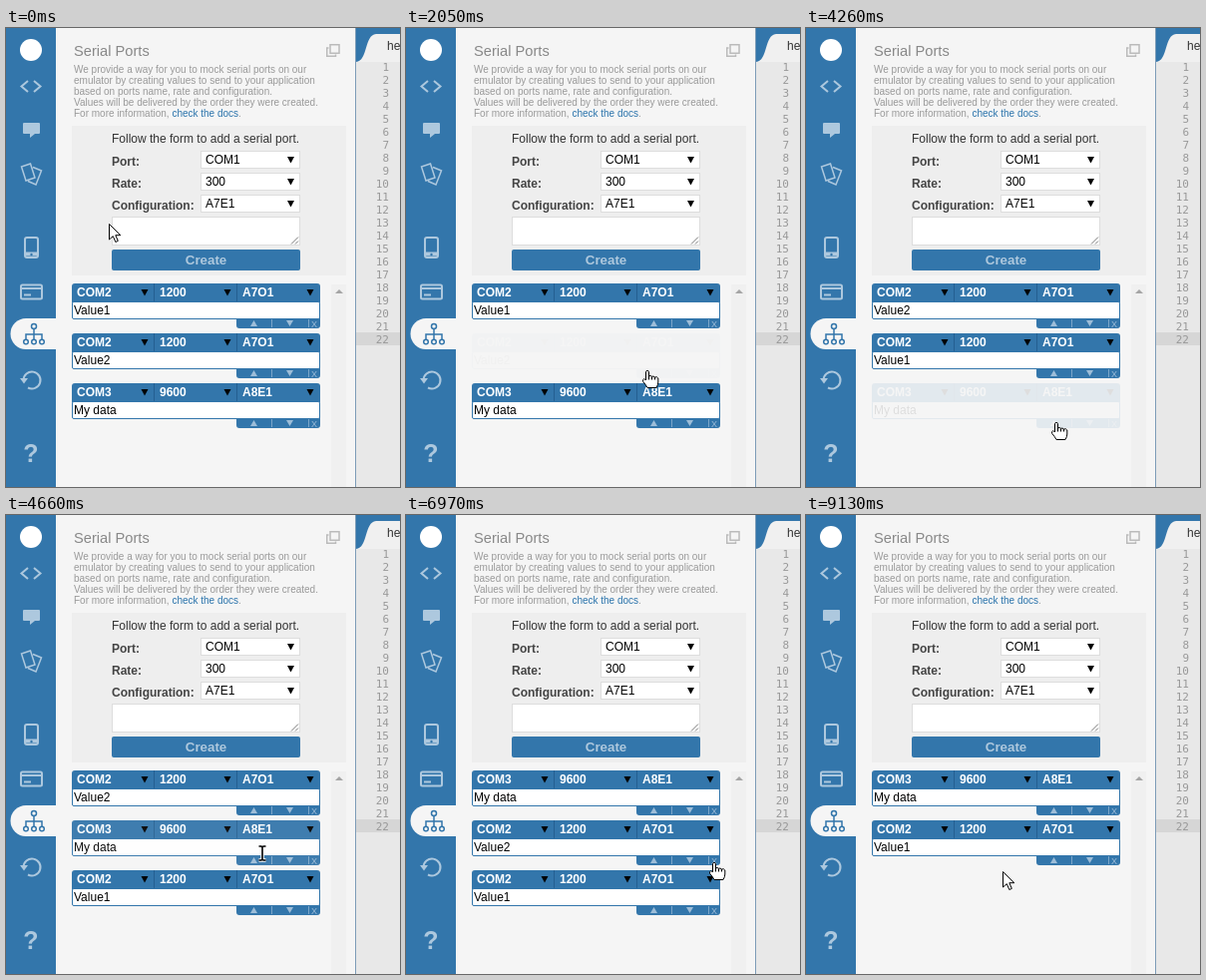
Animation, 395 px wide and 460 px high, one loop 9.34 s. Source, as an HTML page:

```html
<!DOCTYPE html>
<html lang="en">
<head>
<meta charset="utf-8">
<title>Serial Ports</title>
<style>
  html, body { margin: 0; width: 100%; height: 100%; overflow: hidden; background: #f5f5f5; }
  svg { display: block; font: 12px "Liberation Sans", Arial, sans-serif; }
  .bold { font-weight: bold; }
  .small { font-size: 10px; fill: #999; }
  .lines { font: 11px "DejaVu Sans Mono", monospace; fill: #999; text-anchor: end; }
  .icon { fill: none; stroke: #adc8de; stroke-width: 2; }
  .button { fill: #9dbdd8; }
  .button.hover { fill: #fff; }
  .box { fill: #fff; stroke: #ddd; }
  .cursor { fill: #fff; stroke: #000; stroke-linejoin: round; }
</style>
</head>
<body>
<svg width="395" height="460" viewBox="0 0 395 460">
  <rect width="395" height="460" fill="#f5f5f5"/>

  <!-- sidebar -->
  <rect width="50" height="460" fill="#3376ab"/>
  <circle cx="25" cy="22" r="11" fill="#fff"/>
  <g class="icon">
    <path d="M22 53L15.500 58.500L22 64M28 53L34.500 58.500L28 64"/>
    <path d="M18 95H33Q34 95 34 96V105Q34 106 33 106H29L24 110V106H18Q17 106 17 105V96Q17 95 18 95Z" fill="#adc8de" stroke="none"/>
    <path d="M15.500 139L24.500 136L29 150L20 153ZM27 139.500L35.500 143L30 157L22 153.500" stroke-width="1.500"/>
    <rect x="19" y="210" width="13" height="20" rx="2"/>
    <path d="M19 226.500H32" stroke-width="4"/>
    <circle cx="25.500" cy="227" r="1.200" fill="#3376ab" stroke="none"/>
    <rect x="15" y="257.500" width="21" height="14" rx="1.500"/>
    <path d="M15 261H36M18 267.500H25"/>
    <path d="M17.500 353A8.500 8.500 0 1 1 22 360.500"/>
    <path d="M14 351H22L18 356.500Z" fill="#adc8de" stroke="none"/>
  </g>
  <path d="M50 291H20A15.500 15.500 0 0 0 20 322H50Z" fill="#f5f5f5"/>
  <g fill="none" stroke="#3376ab" stroke-width="1.500">
    <path d="M28 301V312M20 312V307H36V312"/>
    <circle cx="28" cy="299" r="2.500"/>
    <circle cx="20" cy="314.500" r="2.300"/>
    <circle cx="28" cy="314.500" r="2.300"/>
    <circle cx="36" cy="314.500" r="2.300"/>
  </g>
  <text class="bold" x="25" y="435" font-size="25" fill="#adc8de" text-anchor="middle">?</text>

  <!-- editor -->
  <rect x="350" width="1" height="460" fill="#7d9cb8"/>
  <rect x="351" width="44" height="34" fill="#3376ab"/>
  <path d="M351 34C363 33 359 7 371 6H395V34Z" fill="#f0f0f0"/>
  <rect x="351" y="34" width="44" height="426" fill="#e8e8e8"/>
  <rect x="351" y="305" width="44" height="13" fill="#d6d6d6"/>
  <text x="382" y="22" fill="#333">he</text>
  <g class="lines" id="lines"></g>

  <!-- panel -->
  <text x="68" y="28" font-size="14.670" fill="#888">Serial Ports</text>
  <g fill="none" stroke="#bbb" stroke-width="1.500">
    <rect x="325" y="16.750" width="9" height="8.500"/>
    <path d="M323.500 20H321.750V28.250H330.500V26.500"/>
  </g>
  <g class="small">
    <text x="68" y="45">We provide a way for you to mock serial ports on our</text>
    <text x="68" y="56">emulator by creating values to send to your application</text>
    <text x="68" y="67">based on ports name, rate and configuration.</text>
    <text x="68" y="78">Values will be delivered by the order they were created.</text>
    <text x="68" y="89">For more information, <tspan fill="#2a73ab">check the docs</tspan>.</text>
  </g>

  <!-- form -->
  <rect x="66" y="98" width="275" height="150" fill="#eee"/>
  <text x="106" y="115" fill="#333">Follow the form to add a serial port.</text>
  <g id="fields"></g>
  <rect class="box" x="106.500" y="189.500" width="188" height="28"/>
  <path d="M286 216.500L293 209.500M290 216.500L293 213.500" stroke="#777"/>
  <rect x="106" y="222" width="189" height="21" rx="2" fill="#3376ab"/>
  <text class="bold" x="200.500" y="237" font-size="13.330" fill="#aec8dd" text-anchor="middle">Create</text>

  <!-- list -->
  <rect x="326" y="257" width="15" height="203" fill="#f0f0f0"/>
  <path d="M330 266H338L334 262Z" fill="#a5a5a5"/>
  <g id="list"></g>

  <g class="cursor" id="arrow"><path d="M.500 .500V16L4.300 12.600L6.800 18.500L9.300 17.400L6.800 11.700H11.800Z"/></g>
  <g class="cursor" id="hand">
    <path d="M-1.500 10V1.500Q-1.500 .500 0 .500Q1.500 .500 1.500 1.500V6Q3 4.800 4.500 6.300Q6 5.400 7.500 7Q9.500 6 10.800 8V12Q10.800 14.500 9 17.500H0Q-1.500 14.500-4.200 11.500Q-5.200 9.300-3.500 8.800Q-2.300 8.800-1.500 10Z"/>
    <path d="M1.500 6V9.500M4.500 6.500V9.500M7.500 7V9.500" fill="none"/>
  </g>
  <g id="beam" fill="none">
    <path d="M-3.500-7H-1L0-6L1-7H3.500M-3.500 7H-1L0 6L1 7H3.500M0-6V6" stroke="#fff" stroke-width="3.500"/>
    <path d="M-3.500-7H-1L0-6L1-7H3.500M-3.500 7H-1L0 6L1 7H3.500M0-6V6" stroke="#000" stroke-width="1.600"/>
  </g>
</svg>
<script>
const LOOP = 9340, ROW_TOP = 256, ROW_STEP = 50;
const FADE_START = 30, FADE_END = 490, RETURN_END = 860;
const byId = id => document.getElementById(id);
const down = (x, y) => `<path d="M${x - 3.5} ${y}h7l-3.500 6.500z"/>`;

byId("lines").innerHTML = Array.from({ length: 22 }, (_, i) =>
  `<text x="384" y="${43 + 13 * i}">${i + 1}</text>`).join("");

byId("fields").innerHTML = [["Port:", "COM1"], ["Rate:", "300"], ["Configuration:", "A7E1"]]
  .map(([label, value], i) => {
    const y = 22 * i;
    return `<text class="bold" x="106" y="${137.5 + y}" fill="#444">${label}</text>
      <rect class="box" x="195.500" y="${123.5 + y}" width="99" height="17"/>
      <text x="200" y="${136 + y}">${value}</text>${down(285.5, 129 + y)}`;
  }).join("");

function makeItem(columns, value) {
  const group = document.createElementNS("http://www.w3.org/2000/svg", "g");
  const heads = columns.map((text, i) =>
    `<text class="bold" x="${71 + 83 * i}" y="13" fill="#fff">${text}</text>${down(139 + 83 * i, 6)}`);
  group.innerHTML = `
    <path d="M231 34H315V42Q315 45 312 45H234Q231 45 231 42Z" fill="#3376ab"/>
    <path d="M66 19V3Q66 0 69 0H312Q315 0 315 3V19Z" fill="#3376ab"/>
    <path d="M148.500 0V19M231.500 0V19" stroke="#245f91"/>
    <rect x="66.500" y="18.500" width="248" height="17" rx="1.500" fill="#fff" stroke="#3376ab"/>
    ${heads.join("")}
    <text x="68" y="31">${value}</text>
    <path d="M266.500 36V44M303.500 36V44" stroke="#7ba5c9"/>
    <path class="button" d="M245 43H252L248.500 37Z"/>
    <path class="button" d="M281 37H288L284.500 43Z"/>
    <text class="button" x="309" y="43.500" font-size="9" text-anchor="middle">X</text>`;
  byId("list").append(group);
  return { group, buttons: [...group.querySelectorAll(".button")] };
}

const first = makeItem(["COM2", "1200", "A7O1"], "Value1");
const second = makeItem(["COM2", "1200", "A7O1"], "Value2");
const third = makeItem(["COM3", "9600", "A8E1"], "My data");
const items = [first, second, third];

// Each action fades an item out, then the list takes its new order.
const actions = [
  { start: 1600, item: second, order: [second, first, third] },
  { start: 3860, item: third, order: [second, third, first] },
  { start: 5820, item: second, order: [third, second, first] },
  { start: 7770, item: second, order: [third, first] },
];

// Pointer hot spot: time, x, y
const path = [
  [0, 103, 196], [40, 103, 196], [860, 246, 344], [1700, 246, 344], [2000, 242, 343],
  [2450, 242, 341], [2720, 242, 341], [2740, 243, 341], [2870, 243, 341], [3490, 252, 395],
  [3650, 252, 395], [3670, 251, 395], [4300, 251, 395], [4480, 257, 372], [4660, 257, 339],
  [4780, 250, 296], [4900, 258, 290], [5190, 285, 292], [6560, 285, 292], [6750, 296, 321],
  [6970, 309, 348], [7080, 310, 350], [7220, 310, 344], [8670, 310, 344], [8900, 245, 361],
  [9130, 197, 357], [LOOP, 197, 357],
];

// Zero at the ends of every pause, otherwise the mean speed around the point.
function speed(i, axis) {
  const before = path[i - 1], here = path[i], after = path[i + 1];
  const same = p => !p || (p[1] === here[1] && p[2] === here[2]);
  return same(before) || same(after) ? 0 : (after[axis] - before[axis]) / (after[0] - before[0]);
}

function pointerAt(time) {
  const i = Math.max(0, path.findIndex(p => p[0] > time) - 1);
  const a = path[i], b = path[i + 1], span = b[0] - a[0];
  const u = Math.max(0, time - a[0]) / span, v = 1 - u;
  return [1, 2].map(k => a[k] * v * v * (1 + 2 * u) + b[k] * u * u * (3 - 2 * u)
    + span * u * v * (v * speed(i, k) - u * speed(i + 1, k)));
}

function hit([x, y], rows) {
  const row = Math.floor((y - ROW_TOP) / ROW_STEP), inner = y - ROW_TOP - row * ROW_STEP;
  if (x > 106 && x < 295 && y > 189 && y < 218) return { kind: "beam" };
  if (x > 106 && x < 295 && y > 222 && y < 243) return { kind: "hand" };
  if (x < 66 || x > 315 || row < 0 || row >= rows || inner < 19) return { kind: "arrow" };
  if (inner < 35) return { kind: "beam" };
  if (x < 231 || inner > 45) return { kind: "arrow" };
  return { kind: "hand", row, button: x < 267 ? 0 : x < 303 ? 1 : 2 };
}

const swing = u => 0.5 - Math.cos(Math.PI * Math.min(1, Math.max(0, u))) / 2;

function draw(time) {
  let order = items, fading = null, opacity = 1;
  for (const action of actions) {
    const age = time - action.start;
    if (age < 0) break;
    fading = action.item;
    opacity = age < FADE_END
      ? 1 - swing((age - FADE_START) / (FADE_END - FADE_START))
      : swing((age - FADE_END) / (RETURN_END - FADE_END));
    if (age >= FADE_END) order = action.order;
  }

  const hovered = hit(pointerAt(Math.max(0, time - 70)), order.length);
  for (const item of items) {
    const row = order.indexOf(item);
    item.group.setAttribute("visibility", row < 0 ? "hidden" : "visible");
    item.group.setAttribute("transform", `translate(0 ${ROW_TOP + ROW_STEP * row})`);
    item.group.setAttribute("opacity", item === fading ? opacity : 1);
    item.buttons.forEach((button, i) =>
      button.classList.toggle("hover", hovered.row === row && hovered.button === i));
  }

  const point = pointerAt(time), { kind } = hit(point, order.length);
  for (const id of ["arrow", "hand", "beam"]) {
    byId(id).setAttribute("visibility", id === kind ? "visible" : "hidden");
    byId(id).setAttribute("transform", `translate(${point.map(Math.round)})`);
  }
}

const begin = performance.now();
function frame() {
  draw((performance.now() - begin) % LOOP);
  requestAnimationFrame(frame);
}
frame();
</script>
</body>
</html>
```
